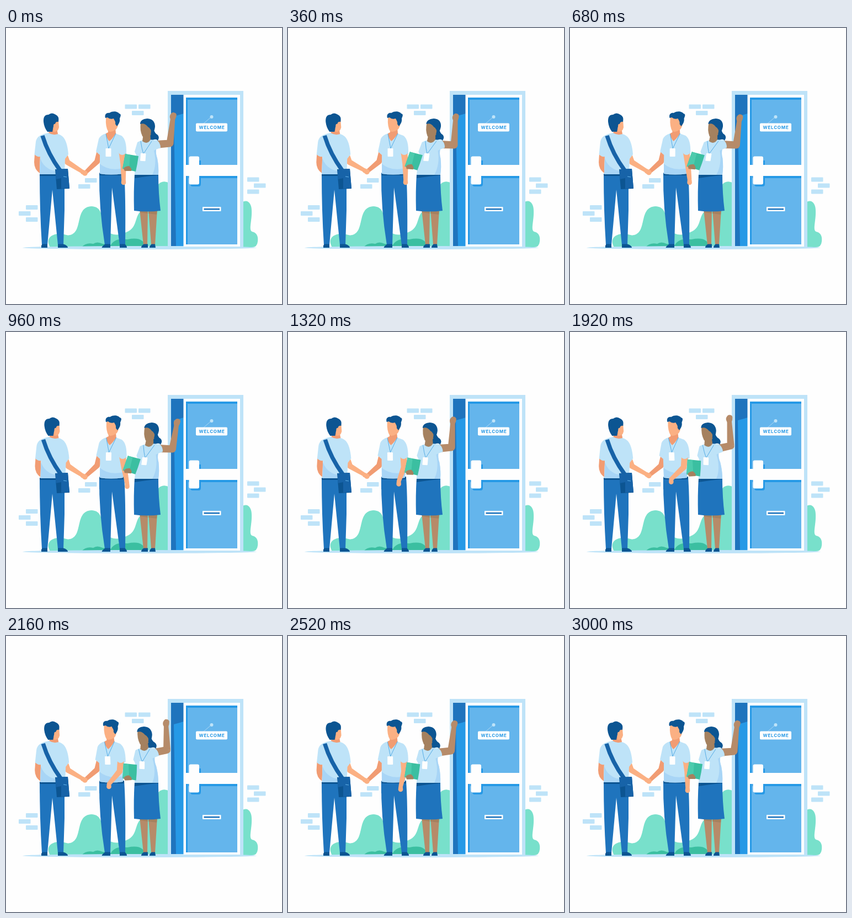
An HTML page that plays this animation: 500x500 px, repeating every 3040 ms.

```html
<!DOCTYPE html>
<html lang="en">
<head>
<meta charset="utf-8">
<title>Welcome</title>
<style>
html, body { margin: 0; width: 100%; height: 100%; overflow: hidden; background: #fefefe; }
svg { display: block; width: 100%; height: 100%; }
.pale { fill: #bee3f8; } .fold { fill: #a8d5f6; } .mid { fill: #64b5ec; } .bright { fill: #2699e6; }
.blue { fill: #1f74bd; } .navy { fill: #0c5592; } .white { fill: #fefefe; }
.skin { fill: #fbb083; } .blush { fill: #f19c73; }
.tan { fill: #b68b69; } .umber { fill: #a5815f; }
.mint { fill: #78e0cb; } .green { fill: #3bbfa1; }
.cord { fill: none; stroke: #4ba6e3; stroke-width: .9; }
text { font: 700 8px Inter, Roboto, sans-serif; letter-spacing: .75px; }
</style>
</head>
<body>
<svg viewBox="0 0 500 500">
  <g id="bricks" class="pale"></g>

  <!-- bushes and ground -->
  <g class="mint">
    <path d="M80 397C73 386 77 374 95 373C108 372 110 378 119 374C139 366 125 324 155 323C183 324 169 364 186 371C202 378 212 373 222 368C239 359 233 336 247 331C285 325 263 289 280 280Q287 276 296 281V397Z"/>
    <path d="M428 316C437 309 445 318 445 330C446 349 439 366 446 369C456 371 457 380 456 387Q455 397 446 397H428Z"/>
  </g>
  <path class="green" d="M137 397Q145 388 158 391Q165 386 175 391L190 393C197 381 210 382 220 383Q239 379 247 386Q253 390 252 397Z"/>
  <ellipse class="pale" cx="242" cy="398" rx="212" ry="3"/>

  <!-- door -->
  <path class="pale" d="M293 114H430V397H293Z"/>
  <path class="bright" d="M299 121H322V395H299Z"/>
  <path class="blue" d="M299 121H322V155L304 160L308 395H299Z"/>
  <path class="white" d="M321.500 121H424V396H321.500Z"/>
  <path class="bright" d="M326 126H419V392H326Z"/>
  <path class="mid" d="M329 130H419V392H329Z"/>
  <path class="bright" d="M330 268H419V272H330ZM335 240H353V283Q353 287 349 287H338Q334 287 334 283Z"/>
  <path class="white" d="M322 248H424V268H322Z"/>
  <rect class="white" x="331.500" y="232.500" width="18.500" height="51" rx="3"/>
  <rect class="white" x="356" y="324" width="33.500" height="8" rx="1"/>
  <path class="blue" d="M358.500 326.800H387V329.500H358.500Z"/>
  <path d="M358 173L372 161" fill="none" stroke="#a9d6f4" stroke-width="1"/>
  <circle class="pale" cx="372.500" cy="161" r="3"/>
  <rect class="white" x="344" y="172.500" width="57" height="15" rx="2"/>
  <text class="bright" x="373" y="183.200" text-anchor="middle">WELCOME</text>

  <!-- man in the middle -->
  <path class="blue" d="M169 263H214Q217 300 216 393H206L192 289L189 393H179Q168 325 169 263Z"/>
  <path class="navy" d="M173.500 398Q175 394 180 391.500H189V398ZM206 398V391.500H215Q219 394 219 398ZM169.500 262H214V267H169.500Z"/>
  <path id="shakeArm" class="blush"/>
  <g id="host">
    <path class="pale" d="M181 191Q171 194 168 201L163 224L170 230V264Q190 267 212 264L213 232L218 228Q219 202 209 195L198 191Z"/>
    <path class="fold" d="M170 246Q186 260 213 254L212 264Q190 267 170 264Z"/>
    <path class="blush" d="M185 180H198L199 191Q192 202 187 205Q181 198 181 191L185 189Z"/>
    <path class="skin" d="M181 163Q190 157 203 166Q205 176 200 183Q191 190 185 187Q180 179 181 163Z"/>
    <path class="navy" d="M180 163C178 157 182 153 187 154C195 149 203 152 205 155C210 156 207 161 206 164C207 170 204 174 201 178L198 174C199 169 196 167 195 164Q188 166 184 162Z"/>
    <path class="cord" d="M181 192L186 218L199 191"/>
    <rect class="white" x="180.500" y="218" width="10" height="15" rx="1"/>
  </g>
  <path id="hostArm" class="skin"/>
  <path id="hostSleeve" class="pale"/>

  <!-- woman -->
  <path class="tan" d="M242 328H257L256 393H249ZM258 328H274L270 393H263Z"/>
  <path class="umber" d="M242 328H257V336L243 334ZM258 328H274L273 338L258 336Z"/>
  <path class="navy" d="M245 398Q245 394 250 391.500H257V398ZM260 398Q260 394 264 391.500H270L271 398Z"/>
  <path class="blue" d="M233 265H276Q276 300 280 331Q256 334 232 331Q231 295 233 265Z"/>
  <path class="navy" d="M233 265H276V267Q258 268 233 272Z"/>
  <path id="waveArm" class="tan"/>
  <path id="waveHand" class="tan" d="M-4 5Q-7 0 -5 -4Q-2 -9 1 -8Q5 -8 6 -4Q6 1 4 5Z"/>
  <g id="woman">
    <path class="navy" d="M258 171C269 173 265 188 274 193Q279 197 275 204Q272 200 266 203Q258 207 254 200Z"/>
    <path class="pale" d="M238 207Q247 202 257 202L273 203Q280 208 280 217L272 220Q271 228 274 236Q277 252 276 266H233Q233 247 236 230L233 224Z"/>
    <path class="fold" d="M272 220Q271 228 274 236Q277 252 276 266H265Q274 248 268 222Z"/>
    <path class="umber" d="M249 190H261L262 202Q256 212 247 205Z"/>
    <path class="umber" d="M244 172Q253 165 264 173Q269 188 260 196Q252 201 247 196Q242 185 244 172Z"/>
    <path class="navy" d="M243 174Q243 165 256 164Q270 165 270 179Q269 189 262 193Q265 183 257 179Q251 171 243 174Z"/>
    <path class="cord" d="M244 205Q246 219 249 228L264 205"/>
    <rect class="white" x="243.500" y="227" width="9.500" height="14" rx="1" transform="rotate(4 248 234)"/>
    <g id="book">
      <path class="green" d="M216 228L240 232Q238 247 235 260L211 255Z"/>
      <path d="M216 228L225 230L223 257L211 255Z" fill="#4ccbad"/>
      <path class="umber" d="M213 254Q217 250 223 250Q229 255 227 259L215 259Z"/>
    </g>
  </g>

  <!-- visitor -->
  <path class="blue" d="M61 264H106V330L104 393H94L84 293L75 393H65Q61 330 61 264Z"/>
  <path class="navy" d="M64 398V394L66 391.500H75V398ZM94 398V391.500H104Q112 394 112 398ZM61 264H106V268H61Z"/>
  <path id="visitorArm" class="skin"/>
  <g id="visitor">
    <path class="blush" d="M52 228H62L61 263Q51 256 51 243Z"/>
    <path class="pale" d="M77 190Q56 193 54 206L51.500 229Q56 234 62 233L61 265H106L107 237L113 229Q111 205 103 197Q99 193 91 191Z"/>
    <path class="fold" d="M62 236Q70 261 106 261V265H61Z"/>
    <path class="blush" d="M81 182H92L94 192Q85 195 77 190Z"/>
    <path class="skin" d="M84 167H95L96 180Q94 189 86 188Z"/>
    <path class="navy" d="M68 170Q67 157 77 157Q83 152 90 157Q97 160 95 170Q90 169 89 174Q86 173 86 178L84 188H75Q69 180 68 170Z"/>
    <path d="M66 195Q76 228 98 258" fill="none" stroke="#1763a8" stroke-width="7.500"/>
  </g>
  <path class="navy" d="M89 256L112 255L115 291L92 292Z"/>
  <path d="M90 256L112 255L115 290L100 291V272L90 274Z" fill="#1763a8"/>
  <path d="M104 269L110 270" stroke="#64b5ec" stroke-width="1"/>
  <path id="grip" class="skin"/>
</svg>
<script>
const LOOP = 3040;
const TIMES = [0, 360, 960, 1680, 2160, 2520, 3000];
const el = id => document.getElementById(id);

// Pose values at TIMES; the value at 0 closes the loop.
const tracks = {
  lean:   [0, .08, .08, -.06, -.06, -.015, 0],
  elbowX: [297, 301, 301.5, 291, 291.5, 295.5, 297],
  elbowY: [209, 212, 212, 206, 206.5, 208, 209],
  waveX:  [302.5, 303.5, 309.5, 288, 290, 301, 302.5],
  waveY:  [161, 163, 165, 158, 159, 161, 161],
  armX:   [213, 213, 219.5, 182, 186.5, 204, 213],
  armY:   [280, 280, 280, 271, 273, 278, 280],
  bendX:  [212.5, 212.5, 214, 206, 206, 210.5, 212.5],
  hostLean: [0, 0, .01, -.035, -.035, -.008, 0],
  visitX: [0, .3, 1.5, 1.2, 1.2, .6, 0],
  shakeY: [262, 259.5, 261.5, 259, 260, 262, 262]
};

// Periodic cubic through the pose values, flat at every turning point.
function sample(values, t) {
  const n = TIMES.length;
  const at = k => values[(k + n) % n];
  const time = k => TIMES[(k + n) % n] + LOOP * Math.floor(k / n);
  const slope = k => (at(k + 1) - at(k)) / (time(k + 1) - time(k));
  const tangent = k => {
    const a = slope(k - 1), b = slope(k);
    return a * b <= 0 ? 0 : 2 * a * b / (a + b);
  };
  let k = n - 1;
  while (TIMES[k] > t) k--;
  const span = time(k + 1) - time(k), u = (t - time(k)) / span, v = 1 - u;
  return at(k) * (1 + 2 * u) * v * v + at(k + 1) * u * u * (3 - 2 * u)
    + span * u * v * (tangent(k) * v - tangent(k + 1) * u);
}

// Tapered limb through joints [x, y, radius].
function limb(id, ...joints) {
  let d = "";
  joints.forEach(([x, y, r], i) => {
    d += `M${x - r} ${y}a${r} ${r} 0 1 1 ${2 * r} 0a${r} ${r} 0 1 1 ${-2 * r} 0Z`;
    const next = joints[i + 1];
    if (!next) return;
    const [x2, y2, r2] = next, len = Math.hypot(x2 - x, y2 - y);
    const nx = (y2 - y) / len, ny = (x - x2) / len;
    d += `M${x + nx * r} ${y + ny * r}L${x2 + nx * r2} ${y2 + ny * r2}`
      + `L${x2 - nx * r2} ${y2 - ny * r2}L${x - nx * r} ${y - ny * r}Z`;
  });
  el(id).setAttribute("d", d);
}

const place = (id, transform) => el(id).setAttribute("transform", transform);
const shear = (id, k, base) => place(id, `matrix(1 0 ${-k} 1 ${k * base} 0)`);

function draw(t) {
  const p = {};
  for (const name in tracks) p[name] = sample(tracks[name], t);

  shear("woman", p.lean, 266);
  place("book", `translate(0 ${-p.lean * 36}) rotate(${p.lean * 60} 226 245)`);
  limb("waveArm", [272 + p.lean * 56, 211, 7], [p.elbowX, p.elbowY, 6.5], [p.waveX, p.waveY, 4]);
  const tilt = Math.atan2(p.waveX - p.elbowX, p.elbowY - p.waveY) * 180 / Math.PI;
  place("waveHand", `translate(${p.waveX} ${p.waveY}) rotate(${tilt})`);

  shear("host", p.hostLean, 264);
  const shoulder = 209 + p.hostLean * 50;
  limb("hostArm", [shoulder + 1, 222, 6], [p.bendX, 245, 5.3], [p.armX, p.armY - 5, 3.8], [p.armX, p.armY, 4.3]);
  const sx = shoulder + 1 + (p.bendX - shoulder - 1) * .25;
  limb("hostSleeve", [shoulder - 1, 207, 7.5], [sx, 223, 7]);
  limb("shakeArm", [170, 224, 5.5], [165, 242, 5], [144, p.shakeY, 3.5]);

  place("visitor", `translate(${p.visitX} 0)`);
  limb("visitorArm", [105 + p.visitX, 229, 6], [111 + p.visitX, 243, 5], [138, p.shakeY - 2, 3.5]);
  limb("grip", [139, p.shakeY - 1, 4], [143, p.shakeY + 1, 4.8]);
}

for (let row = 0; row < 3; row++) {
  const side = row % 2;
  const brick = (x, y) => el("bricks").insertAdjacentHTML("beforeend",
    `<rect x="${x}" y="${y}" width="21.5" height="8" rx="1"/>`);
  brick(36 - 13 * side, 321 + 11 * row);
  brick(437 + 12 * side, 270.5 + 11 * row);
  if (row < 2) {
    brick(143 - 12 * row, 272 + 11 * row);
    brick(215.5 + 12.5 * row, 138.5 + 11.5 * row);
  } else brick(240, 138.5);
}

const start = performance.now();
function tick() {
  draw((performance.now() - start) % LOOP);
  requestAnimationFrame(tick);
}
tick();
</script>
</body>
</html>
```
